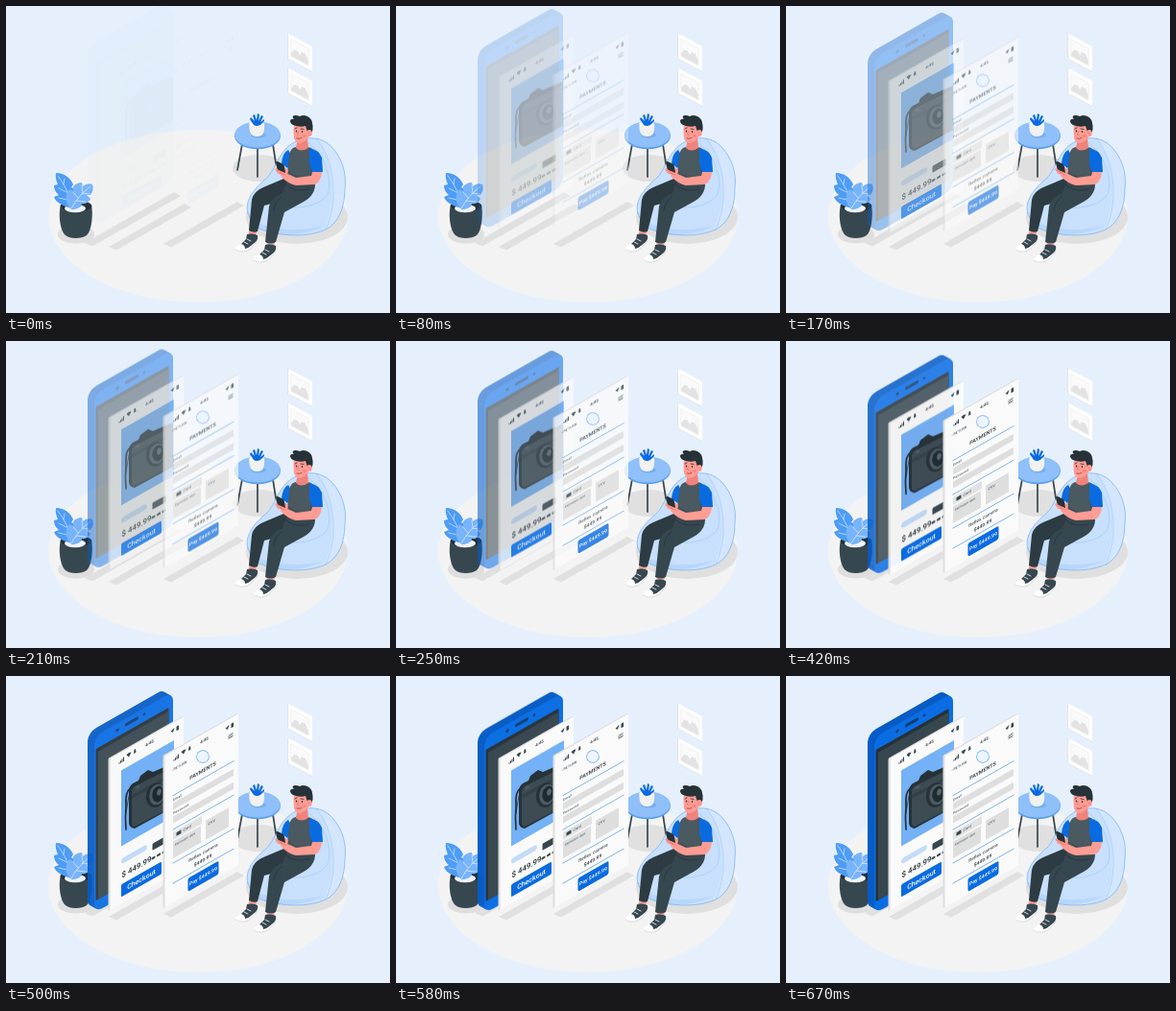
An HTML page with a canvas that plays this animation: 400 px wide and 320 px high, repeating every 710 ms.

```html
<!DOCTYPE html>
<html lang="en">
<head>
<meta charset="utf-8">
<title>Mobile checkout</title>
<style>
html, body { margin: 0; width: 100%; height: 100%; overflow: hidden; background: #e6f0fd; }
canvas { display: block; width: 400px; height: 320px; }
</style>
</head>
<body>
<canvas id="stage"></canvas>
<script>
const W = 400, H = 320, LOOP = 710, SLOPE = -0.57, DROP = 19;
const DARK = '#263238', SLATE = '#37474f', BLUE = '#0a6be0', SKIN = '#ff9c93';
const ratio = Math.max(1, window.devicePixelRatio || 1);
const stage = document.getElementById('stage');
const screen2d = setup(stage);
let c;

function setup(canvas) {
  canvas.width = W * ratio;
  canvas.height = H * ratio;
  const context = canvas.getContext('2d');
  context.scale(ratio, ratio);
  context.lineCap = context.lineJoin = 'round';
  return context;
}

function layer(draw) {
  const canvas = document.createElement('canvas');
  c = setup(canvas);
  draw();
  return canvas;
}

function fill(path, color) {
  c.fillStyle = color;
  c.fill(new Path2D(path));
}

function line(path, color, width = 1) {
  c.strokeStyle = color;
  c.lineWidth = width;
  c.stroke(new Path2D(path));
}

function oval(x, y, rx, ry, color, angle = 0) {
  c.fillStyle = color;
  c.beginPath();
  c.ellipse(x, y, rx, ry, angle, 0, Math.PI * 2);
  c.fill();
}

function box(x, y, w, h, color, r = 0) {
  c.fillStyle = color;
  c.beginPath();
  c.roundRect(x, y, w, h, r);
  c.fill();
}

function label(text, x, y, size, color = SLATE, weight = 400, align = 'center') {
  c.font = `${weight} ${size}px Roboto, sans-serif`;
  c.textAlign = align;
  c.textBaseline = 'middle';
  c.fillStyle = color;
  c.fillText(text, x, y);
}

function skewed(x, y, slope, draw) {
  c.save();
  c.transform(1, slope, 0, 1, x, y);
  draw();
  c.restore();
}

function pictureFrame(y) {
  skewed(293, y, 0.54, () => {
    box(0, 0, 26, 27, '#e2e5e9');
    box(1.2, 0, 24.8, 26, '#fff');
    box(3.5, 4, 19, 18.5, '#ececec');
    box(4.2, 4.7, 17.6, 17.1, '#fafafa');
    fill('M4.2 19L9 11L13 16L17 8.5L21.8 17V21.8H4.2Z', '#e3e3e3');
    fill('M7.5 13.5L9 11L10.7 13.2ZM15.3 11.7L17 8.5L18.8 11.7Z', '#fff');
  });
}

function plant() {
  oval(73, 238, 19, 9.5, '#dedede');
  fill('M57 207C54 219 57 235 62 239C66 243 79 243 84 239C89 235 91 219 89 207Z', SLATE);
  oval(73, 208.5, 16.2, 6, DARK);
  oval(72, 211, 11, 4.2, '#f1f6fc');
  fill('M70 211C60 209 52 205 50 199L55 197Q50 193 50 187L54 186Q51 179 52 174C61 174 67 179 70 186L68 189L72 191C76 198 76 206 70 211Z', '#4d9cf5');
  line('M54 177Q65 191 70 211M60 186L61 180M65 195L55 190M68 203L55 200', '#d8eaff', 0.7);
  fill('M68 212C61 205 61 197 66 191L70 193L70 188Q74 184 79 184L80 188Q84 184 90 186Q92 192 88 197L84 197L88 201Q85 207 79 206L78 209Q73 213 68 212Z', '#78b4fa');
  line('M88 188Q75 198 68 211M80 194L79 187M75 200L70 194M79 195L87 196M73 203L83 204', '#e2efff', 0.7);
}

function table() {
  oval(263, 169, 27, 14, '#e0e0e0');
  line('M246 144L241 171M262 147V178M278 144L282 170', SLATE, 1.7);
  oval(262, 135.3, 24, 14, '#5b9fee');
  oval(262, 134, 23.7, 13.4, '#8fc0fa');
  oval(263, 134.5, 8, 3, '#75afef');
  fill('M253.5 122.5C253 128 254 133 257 135Q261 137 266 135C269 133 269.5 128 269 122.5Z', '#f1f1f1');
  oval(261.2, 122.6, 7.8, 2.7, '#fff');
  fill('M258 124L254 118L255 116L259 120L257 114L259 113L261 119L262 112L264 113L263 120L266 114L268 115L265 121L269 118L269 120L265 124Q261 126 258 124Z', BLUE);
}

function beanbag() {
  oval(303, 220, 53, 28, '#dfdfdf');
  const shape = 'M252 216C248 205 257 191 271 180C280 172 284 152 297 144C310 135 329 135 340 148C350 159 355 174 353 190C353 209 347 226 333 233C314 242 282 240 264 232Q255 226 252 216Z';
  fill(shape, '#c8e0fc');
  fill('M323 138C340 158 347 198 331 234C346 228 353 209 353 190C356 165 342 140 323 138Z', '#d3e6fd');
  fill('M252 216C262 233 301 237 331 229C305 242 277 240 264 232Q255 226 252 216Z', '#b7d6fb');
  line('M323 138C341 158 348 200 333 233M309 139C331 150 341 180 335 196C326 211 296 213 284 207', '#9bc7f8', 0.6);
  line(shape, '#75b0f5', 0.7);
}

function shoe(x, y) {
  c.save();
  c.translate(x, y);
  fill('M-12 5L-7 1L-1 -5L0 -9Q6 -11 11 -8L12 -5Q12 -2 9 0L4 5Q-2 10 -10 8Q-13 7 -12 5Z', '#fff');
  fill('M-6 1L-1 -4L0 -9Q6 -11 11 -8Q12 -4 9 -1L4 3Q1 6 -2 6Q-2 2 -6 1Z', SLATE);
  line('M-3 -1L1 1M0 -4L4 -2', '#fff', 0.8);
  line('M-12 7Q-3 12 4 6L11 -2', '#c8cdd1', 0.6);
  c.restore();
}

function man() {
  fill('M254 230H262L260 242H252ZM272 243H280L279 254H271Z', SKIN);
  shoe(251, 247);
  shoe(270, 258);
  fill('M294 178L318 185C318 196 307 204 284 204L269 208L262 235Q258 237 253 234L256 202Q258 193 268 189Z', '#2d3b42');
  fill('M292 184Q308 176 322 183Q323 197 310 204L290 215L281 246Q276 249 270 246L274 209Q276 200 288 195Z', SLATE);
  line('M291 186Q300 195 315 191M287 199Q280 204 279 213', '#22303a', 0.7);

  fill('M294 150Q288 153 287 164L293 169L300 160Z', BLUE);
  fill('M299 148Q307 144 318 148L322 154L319 183Q306 187 292 180L295 158Q295 151 299 148Z', '#4b5960');
  line('M320 154Q317 169 318 183M294 173Q301 180 317 179', '#35444c', 0.7);
  fill('M316 148Q326 150 329 158L330 173L319 174L316 165Z', BLUE);
  fill('M319 173H329Q328 183 322 186L302 187Q293 185 286 177L288 173Q296 176 302 179L318 177Z', SKIN);
  fill('M287 166L294 171L293 177L283 175L280 170Z', SKIN);
  fill('M281 163Q281 162 283 162L289 165Q290 166 291 174L284 171Q282 170 281 163Z', DARK);
  line('M282 171L288 174M285 174L291 176', '#e4776f', 0.8);

  fill('M304 138L314 137L315 148Q307 153 302 148Z', '#f0837b');
  fill('M300 122Q299 130 300 138Q302 143 306 143Q311 142 314 138L318 133Q319 122 312 120Z', SKIN);
  fill('M299 124C294 121 296 117 300 118C296 114 302 113 306 115C312 112 319 117 319 122Q321 129 317 134L314 131L312 125Q306 127 299 124Z', DARK);
  oval(316, 132.5, 2.7, 3.6, SKIN);
  oval(302.5, 130.5, 0.7, 1, DARK);
  oval(308.5, 131, 0.7, 1, DARK);
  line('M301 128L303 127M307 128L310 128.5', DARK, 0.8);
  line('M304.5 131L303.5 134L305 134.5M315 132L317 134', '#de6964', 0.6);
  line('M303 138Q306 139 308 137.5', '#9e3d40', 0.8);
  oval(311, 135.5, 2, 1.3, '#fa8079');
}

function room() {
  c.fillStyle = '#e6f0fd';
  c.fillRect(0, 0, W, H);
  oval(200, 219, 156, 90, '#f3f3f3');
  for (const [x, y, length] of [[82, 247, 93], [107, 251, 79], [164, 248, 77]]) {
    skewed(x, y, SLOPE, () => fill(`M0 0H${length}L${length + 7} 8H8Z`, '#e0e0e0'));
  }
  pictureFrame(28);
  pictureFrame(64);
  plant();
  table();
  beanbag();
  man();
}

function statusBar() {
  for (let i = 0; i < 4; i++) box(9 + i * 1.5, 9.5 - i, 1, 1.5 + i, SLATE);
  fill('M17 6Q19.5 4 22 6L19.5 9.5Z', SLATE);
  fill('M25 5H26.5L27 9H24.5Z', SLATE);
  label('4:45', 41, 7.5, 4.4, DARK, 500);
  fill('M63 8L67 6L65.5 10Z', SLATE);
  box(69, 6, 2.6, 4.5, SLATE, 0.5);
}

function panelBase() {
  box(-2, -1.2, 78, 159, '#dedede', 1);
  box(0, 0, 76.5, 158, '#fafafa', 1);
  statusBar();
}

function phone() {
  const x = 92, y = 64, corner = 9;
  for (let i = 7; i > 0; i--) {
    skewed(x - i, y - i * 0.57, SLOPE, () => box(0, 0, 82, 184, '#075cc6', corner));
  }
  skewed(x, y, SLOPE, () => {
    box(0, 0, 82, 184, '#0a6de4', corner);
    box(1.5, 14, 76, 158, DARK, 1);
    box(4, 18, 73.5, 154, SLATE);
    box(32, 5, 14, 3.2, '#123a70', 1.6);
    oval(24, 7, 1.6, 1.6, '#123a70');
    oval(52, 6.5, 1.3, 1.3, '#123a70');
  });
}

function camera() {
  line('M130 117Q124 120 125 135Q124 148 125 160', DARK, 1.7);
  line('M130 117Q127 128 125 143', DARK, 0.8);
  fill('M128 120Q128 115 132 112L138 109L140 104L148 98L153 100L174 91V137L134 159Q128 158 128 153Z', DARK);
  fill('M131 120Q131 117 134 115L174 95V136L134 157Q131 157 131 153Z', '#3d4b53');
  fill('M131 124L174 101V104L131 128Z', '#33424a');
  oval(156, 124, 10, 13, DARK, 0.25);
  oval(157.5, 123.5, 8, 11, '#4c5b64', 0.25);
  oval(158.5, 123, 6, 8.5, '#1f2b31', 0.25);
  oval(159.5, 121, 2.2, 3.6, '#566670', 0.25);
  oval(137, 116, 2.7, 1.6, '#4c5b64', -0.5);
}

function productPanel() {
  const x = 108.5, y = 86;
  skewed(x, y, SLOPE, () => {
    panelBase();
    box(11.5, 19, 55, 79, '#74b1f6');
  });
  camera();
  skewed(x, y, SLOPE, () => {
    box(11.5, 111, 27, 6, '#c4dcf8', 3);
    box(44, 114, 14, 7, SLATE, 1);
    label('$ 449.99', 12, 129, 7.9, DARK, 500, 'left');
    for (let i = 0; i < 3; i++) box(43 + i * 5.5, 128, 4, 2.4, SLATE, 0.8);
    box(11.5, 138, 42, 13, BLUE, 1.5);
    label('Checkout', 32.5, 144.7, 7, '#fff', 500);
  });
}

function rule(y) {
  box(8, y, 64, 0.9, '#559de9');
}

function paymentPanel() {
  const x = 165.5, y = 83;
  skewed(x, y, SLOPE, () => {
    panelBase();
    label('‹ RETURN', 7, 19.5, 3.7, SLATE, 400, 'left');
    for (let i = 0; i < 3; i++) box(66, 16.5 + i * 1.6, 5, 0.7, SLATE);
    label('PAYMENTS', 39.5, 38.5, 5.4, DARK, 500);
    rule(46);
    label('Email', 8.5, 51.5, 3.7, SLATE, 400, 'left');
    box(8.5, 54.5, 63, 7, '#dedede', 0.5);
    label('Password', 8.5, 65.3, 3.7, SLATE, 400, 'left');
    box(8.5, 68.5, 63, 7, '#dedede', 0.5);
    rule(81.5);
    box(8.5, 85, 30, 8, '#e2e2e2', 0.5);
    box(12, 87, 5, 3.7, SLATE, 0.5);
    label('Card', 19, 89, 4, SLATE, 400, 'left');
    box(8.5, 94.5, 29, 17.5, '#dedede', 0.5);
    label('Expiration date', 10.5, 99, 3.2, SLATE, 400, 'left');
    box(42.5, 92, 24, 20, '#dedede', 0.5);
    label('CVV', 45, 97.3, 3.8, SLATE, 400, 'left');
    rule(116.5);
    label('Reflex camera', 40, 124, 4.8, DARK, 400);
    label('$449.99', 39.5, 131.8, 5, DARK, 500);
    rule(137.5);
    box(24, 141.5, 32, 14, BLUE, 2);
    label('Pay $449.99', 40, 148.7, 5.2, '#fff', 500);
  });
  oval(x + 39.5, y + 1, 6.8, 6.8, '#6baaf3');
  oval(x + 39.5, y + 1, 6.1, 6.1, '#edf5ff');
}

const background = layer(room);
const movers = [
  { image: layer(phone), duration: 680, power: 2.1 },
  { image: layer(productPanel), duration: 550, power: 2.2 },
  { image: layer(paymentPanel), duration: 460, power: 2.2 }
];

function render(ms) {
  // The motion advances in 24 steps per second.
  const time = Math.floor((ms % LOOP + 4) * 0.024) / 0.024 + 12;
  screen2d.globalAlpha = 1;
  screen2d.drawImage(background, 0, 0, W, H);
  for (const { image, duration, power } of movers) {
    const progress = 1 - Math.pow(1 - Math.min(1, time / duration), power);
    screen2d.globalAlpha = Math.pow(progress, 1.3);
    screen2d.drawImage(image, 0, -DROP * (1 - progress), W, H);
  }
}

const start = performance.now();
function tick() {
  render(performance.now() - start);
  requestAnimationFrame(tick);
}
tick();
</script>
</body>
</html>
```
